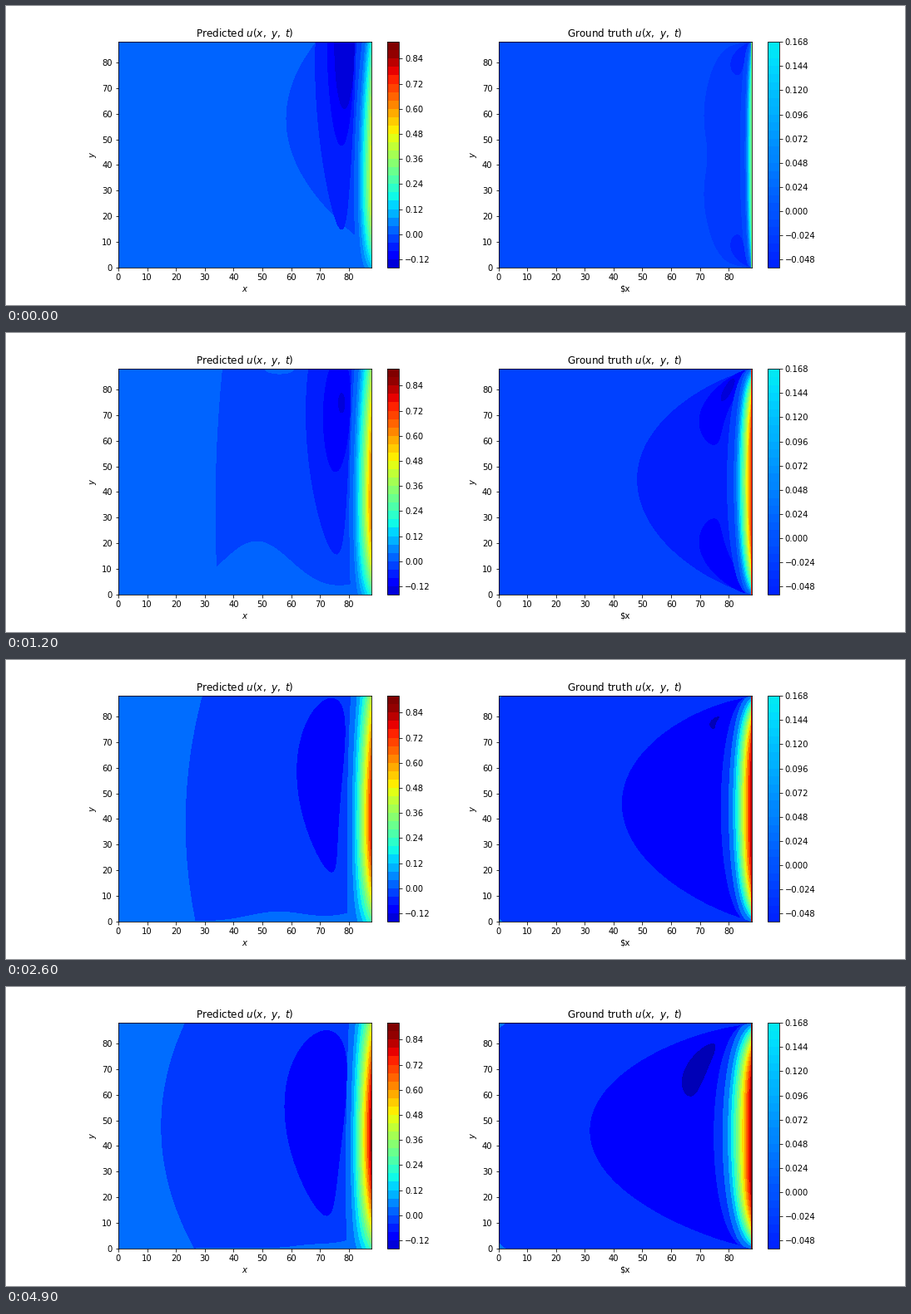
These frames come from a looping animation (1080x360 px, 5000 ms). A matplotlib script:

```python
import numpy as np
import matplotlib.pyplot as plt
from matplotlib.animation import FuncAnimation
from matplotlib.cm import ScalarMappable
from matplotlib.colors import BoundaryNorm, ListedColormap, Normalize
from matplotlib.patches import Polygon

FRAMES, INTERVAL = 50, 100
SIZE = 88
GRID = np.linspace(0, SIZE, 89)
ANGLE = np.linspace(0, 2 * np.pi, 90)
JET = plt.get_cmap("jet")
NORM = Normalize(-0.23, 0.88, clip=True)


def shade(u):
    return JET(float(NORM(u)))


def fade(s, start, end, tau):
    """Exponential approach from start to end."""
    return end + (start - end) * np.exp(-s / tau)


def paint(ax, x, y, u):
    ax.add_patch(Polygon(np.column_stack([x, y]), fc=shade(u), lw=0, antialiased=False))


def right_of(ax, x, u):
    paint(ax, np.append(x, [90, 90]), np.append(GRID, [SIZE, 0]), u)


def egg(ax, u, cx, cy, rx, ry, taper=0, bend=0, lean=0, mirror=False):
    """Oval that can widen upwards, bow to the left and lean over."""
    c, s = np.cos(ANGLE), np.sin(ANGLE)
    x = cx - bend * c**2 + lean * s + rx * (1 + taper * s) * c
    y = cy + ry * s
    paint(ax, x, SIZE - y if mirror else y, u)


def hot_layer(ax, zero, edge, step, power):
    """Bands rising from the zero line to the value on the right side."""
    for k in range(int(edge.max() / step) + 1):
        v = np.clip(k * step / np.maximum(edge, 1e-6), 0, 1) ** (1 / power)
        right_of(ax, zero + (SIZE - zero) * v, (k + 0.5) * step)


def draw_predicted(ax, s):
    step = 0.04 if s < 2.6 else 0.06
    ax.set_facecolor(shade(step / 2))

    # Negative zone: a shallow arc sweeping left, cut by a sinking hump
    arc_y = 28 + 4 * s + fade(s, 30, 0, 0.3)
    curve = 2.3 * (s - 0.6) + fade(s, 24, 0, 0.25)
    arc_x = fade(s, 48.4, 9, 2.6) + fade(s, 10, 0, 0.2)
    right_of(ax, arc_x + curve * ((GRID - arc_y) / 44) ** 2, -step / 2)
    hump = 100 / (1 + (s / 0.7) ** 2.5)
    width = 20 - 2.5 * s
    floor = hump * np.exp(-((GRID - 42 - 5 * s) / width) ** 2) + 2.6 * (GRID / 78) ** 8
    paint(ax, np.append(GRID, [SIZE, 0]), np.append(floor, [-1, -1]), step / 2)
    if 0.5 <= s < 1.4:
        egg(ax, step / 2, 56, SIZE, 14.5 - 8 * s, 13 - 9.25 * s)

    # Cold lobes
    if s < 2.6:
        egg(ax, -1.5 * step, 77.5 - 1.5 * s, 70 - 4 * s, 6.7 + 0.65 * s, 55 - 4.7 * s,
            taper=0.3 - 0.07 * s, bend=2.2 + 0.6 * s)
        egg(ax, -2.5 * step, 77.5 - 1.15 * s, fade(s, 85, 64, 1), 4.6, fade(s, 37.4, 17, 0.9),
            taper=0.1, bend=0.3, lean=0.6 * s)
        left_over = 1 - s / 1.4
        if left_over > 0:
            egg(ax, -3.5 * step, 78.5 - 0.8 * s, fade(s, 88, 74, 0.4),
                3.4 * left_over**0.6, 26 * left_over)
    else:
        egg(ax, -1.5 * step, 76 - 0.75 * s, 58 - 1.85 * s, 4.8 + 1.06 * s, 31.4 + 0.94 * s,
            taper=0.35, bend=4.2)

    zero = fade(s, 82, 79, 1.5) + fade(s, 2.8, 1, 1.5) * ((GRID - 30) / 58) ** 2
    peak, peak_y = fade(s, 0.47, 0.92, 2.3), 34 + 2 * s
    low, high = fade(s, 0.1, 0.25, 1), fade(s, 0.2, 0.42, 1)
    d = GRID - peak_y
    edge = np.where(d < 0, peak - (peak - low) * (d / peak_y) ** 2,
                    peak - (peak - high) * (d / (SIZE - peak_y)) ** 2)
    hot_layer(ax, zero, edge, step, 1.6)


def draw_truth(ax, s):
    early = s < 1.5
    step = (0.02 if s < 0.2 else 0.03 if s < 0.5 else 0.04) if early else 0.07
    ax.set_facecolor(shade(-step / 2))

    # Cold half-oval growing out of the right side
    reach = 17.6 + 18.4 * s if early else 41 * (s / 2) ** 0.35
    mid = min(46, 44 + 0.9 * s)
    below = GRID < mid
    power = 0.3 + 0.38 * s if early else np.where(below, 0.8, 0.68)
    half = np.where(below, mid - 0.6, 87.3 - mid)
    bulge = np.clip(1 - ((GRID - mid) / half) ** 2, 0, 1) ** power
    waist = 2.3 * max(0, 1 - 2 * s) * np.exp(-((GRID - 44) / 12) ** 2)
    right_of(ax, SIZE - reach * bulge + waist, -1.5 * step)

    if early:
        ry = 6 + 7 * s
        for mirror in (False, True):
            egg(ax, -2.5 * step, 85 - 3.8 * s, 87.3 - ry, 2.3 + 1.9 * s, ry,
                bend=1.6 + 2.8 * s, lean=2 + 3 * s, mirror=mirror)
        if s >= 0.6:
            ry = 5 * s - 1.8
            egg(ax, -3.5 * step, 85.3 - 4.7 * s, 86.4 - 5.5 * s, 0.5 + 0.7 * s, ry, lean=0.45 * ry)
    elif s > 2.4:
        age = s - 2.4
        ry = 5.85 * age**0.6
        egg(ax, -2.5 * step, 76 - 2.2 * age, 79.8 - ry, 2.3 * age**0.55, ry,
            bend=0.9 + 0.4 * age, lean=0.38 * ry)

    # Hot lens along the right side
    d = (GRID - 44) / 44
    lens = (1 - d**2) ** 0.42
    right_of(ax, SIZE - lens * (4 + 4.1 * s**0.5), -step / 2)
    edge = fade(s, 0.32, 0.87, 0.9) * (1 - d**4)
    hot_layer(ax, SIZE - lens * (2.3 + 3.5 * s**0.5), edge, step, 1.5)

    # Small positive corners
    c = 0.47 * (s - 0.2)
    if not early:
        for y in (0, SIZE):
            paint(ax, [0, c, 0], [y, y, abs(y - c)], step / 2)


def add_bar(ax, low, step, count, ticks):
    levels = low + step * np.arange(count + 1)
    cmap = ListedColormap([shade(u) for u in levels[:-1] + step / 2])
    bar = fig.colorbar(ScalarMappable(BoundaryNorm(levels, count), cmap), ax=ax, ticks=ticks)
    bar.minorticks_off()


plt.rcParams.update({"font.family": "DejaVu Sans", "font.size": 10, "text.kerning_factor": 6})
fig, (left, right) = plt.subplots(1, 2, figsize=(15, 5), dpi=72)
fig.subplots_adjust(left=0.125, right=0.9, bottom=0.125, top=0.88, wspace=0.2)
add_bar(left, -0.16, 0.04, 27, np.arange(-1, 8) * 0.12)
add_bar(right, -0.056, 0.008, 28, np.arange(-2, 8) * 0.024)

for ax, name, xlabel in ((left, "Predicted", "$x$"), (right, "Ground truth", r"\$x")):
    ax.set_title(name + r" $u(x,\ y,\ t)$")
    ax.set(xlim=(0, SIZE), ylim=(0, SIZE), xlabel=xlabel, ylabel="$y$",
           xticks=range(0, SIZE, 10), yticks=range(0, SIZE, 10))


def update(i):
    for ax, draw in ((left, draw_predicted), (right, draw_truth)):
        for patch in list(ax.patches):
            patch.remove()
        draw(ax, i * INTERVAL / 1000)
    return []


anim = FuncAnimation(fig, update, frames=FRAMES, interval=INTERVAL, repeat=True,
                     repeat_delay=0, init_func=lambda: [])
plt.show()
```
